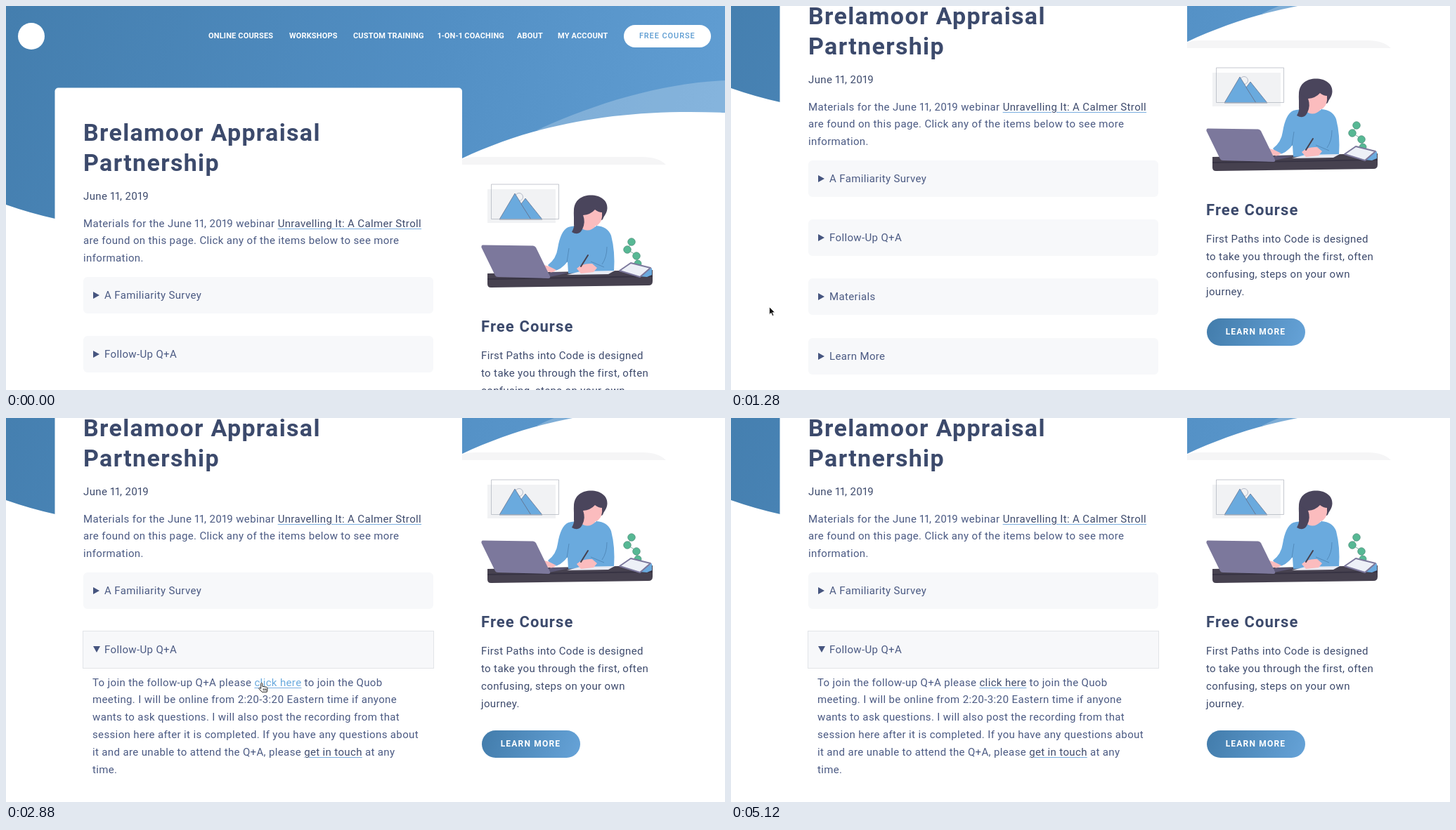
Animation, 1023 px wide and 547 px high, one loop 5280 ms. Source, as an HTML page:

```html
<!DOCTYPE html>
<html lang="en">
<head>
<meta charset="utf-8">
<title>Webinar page</title>
<style>
  html, body { margin: 0; width: 100%; height: 100%; overflow: hidden; background: #fff; }
  body { position: relative; font: 15px/24.85px Roboto, sans-serif; letter-spacing: .36px;
    font-variant-numeric: proportional-nums; color: #4b5a83; }
  #page, #page > *, #pointer { position: absolute; white-space: nowrap; margin: 0; }
  #page { left: 0; top: 0; width: 1023px; height: 720px; }
  svg { left: 0; top: 0; overflow: visible; }
  h1 { left: 110px; top: 158.5px; font: 600 34px/43.7px Roboto, sans-serif; letter-spacing: 1.33px; color: #3c4a6c; }
  h2 { left: 676px; top: 442px; font: 600 22px/30px Roboto, sans-serif; letter-spacing: 1.1px; color: #3c4a6c; }
  .dark, u { color: #3e4b6d; }
  u { text-decoration: underline 1px #7aaee0; text-underline-offset: 2px; }
  u.hover { color: #6aaade; }
  .nav { top: 31px; font-size: 11px; font-weight: bold; letter-spacing: .16px; color: #fff; }
  .pill { border-radius: 20px; text-align: center; }
  #cta { left: 879px; top: 26.5px; width: 123.5px; background: #fff; color: #5b9bd1;
    font: 500 11px/32.5px Roboto, sans-serif; letter-spacing: .9px; }
  #learn { left: 676.5px; top: 610.5px; width: 140px; color: #fff; background: linear-gradient(110deg, #427cab, #66a3d8);
    font: bold 12px/39.5px Roboto, sans-serif; letter-spacing: 1.2px; }
  .item { left: 110px; width: 468px; height: 52px; line-height: 52px; padding-left: 30px;
    border-radius: 6px; background: #f7f8fa; }
  .item::before { content: ""; position: absolute; left: 14px; top: 21px; width: 9px; height: 10px;
    background: #46557f; clip-path: polygon(0 0, 100% 50%, 0 100%); }
  .item.focus { border-radius: 0; box-shadow: 0 0 0 1px #e2e4e8; }
  .item.open::before { width: 10px; height: 9px; clip-path: polygon(0 0, 100% 0, 50% 100%); }
  .tiny { top: 710px; font-size: 5px; line-height: 8px; letter-spacing: .1px; color: #333; }
</style>
</head>
<body>
<div id="page">
  <svg width="1023" height="720">
    <defs>
      <linearGradient id="sky" gradientUnits="userSpaceOnUse" x1="0" y1="0" x2="960" y2="300">
        <stop offset="0" stop-color="#447eae"/><stop offset=".6" stop-color="#528fc4"/><stop offset="1" stop-color="#609dd2"/>
      </linearGradient>
    </defs>
    <path fill="url(#sky)" d="M0 0H1023V152C880 146 760 165 649 217V303H70Q34 295 0 283Z"/>
    <path fill="#fff" fill-opacity=".23" d="M1023 106C930 110 835 140 755 177H1023Z"/>
    <path fill="#f5f5f6" d="M649 218Q655 215 670 215H905Q928 215 939 226H649Z"/>
    <rect x="69.5" y="116.5" width="579.5" height="640" rx="5" fill="#fff"/>
    <circle cx="36" cy="43" r="19" fill="#fff"/>

    <!-- picture on the wall -->
    <path fill="#f1f2f4" d="M685 261H782V309H685Z"/>
    <g stroke="#5f6b86" stroke-width=".7">
      <circle cx="730" cy="272" r="5.5" fill="none" stroke="#9aa3b5"/>
      <path fill="#6aaade" d="M702 304L724 267L747 304Z"/>
      <path fill="#6aaade" d="M733 282L739 274L763 304H747Z"/>
      <path fill="none" stroke="#adb0ba" d="M690.5 254H786.5V303.5H690.5Z"/>
    </g>

    <!-- desk, plant and tablet -->
    <g fill="#57b894" stroke="#4b8a78" stroke-width=".7">
      <path fill="none" d="M890 336L884 347L897 355L899 368"/>
      <circle cx="890" cy="336" r="5.3"/><circle cx="884" cy="347" r="5.3"/>
      <circle cx="897" cy="356" r="5.3"/><circle cx="899" cy="367" r="5"/>
    </g>
    <path fill="#46414f" d="M685 381L920 376V392Q920 398 914 398L690 401Q685 401 685 396Z"/>
    <path fill="#373343" d="M685 388L920 384V386L685 390Z"/>
    <path fill="#6aaade" d="M900 385L919 373V383L912 386Z"/>
    <path fill="#edf0f7" stroke="#7c789c" stroke-width="2" stroke-linejoin="round" d="M873 377L889 366L917 373L902 386Z"/>

    <!-- woman at work -->
    <path fill="#4a455c" d="M808 292C808 276 820 269.500 832 269.500C846 269.500 856 277 855.500 288C855 296 851 298 849 304L834 312L808 312Z"/>
    <path fill="#fbbcbe" d="M821 298Q832 297 838 290Q843 294 848 294Q849 306 843 311Q840 314 838 313V322H818Q823 312 821 298Z"/>
    <path fill="#6aaade" d="M800 315Q808 312 817 315Q828 325 840 313Q856 314 861 327Q867 350 865 378L800 381L799 364Q790 376 778 378L771 369Q783 360 785 345Q789 320 800 315Z"/>
    <path fill="none" stroke="#4d83b3" stroke-width=".8" d="M798 365L801 345M855 343Q855 358 848 368M832 364L851 372"/>
    <path fill="#4a455c" d="M808 290C807 304 811 313 805 322Q815 328 820 318Q825 308 821 298Z"/>
    <path fill="#e9ebf3" d="M798 383L817 378L866 377L857 382Z"/>
    <path fill="#fbbcbe" d="M762 368L773 371L783 376L777 380L766 377ZM812 374Q820 366 834 367L841 373L836 379L818 381Z"/>
    <path stroke="#46414f" stroke-width="2" stroke-linecap="round" d="M828 355L818 371"/>
    <path fill="#5b5775" d="M697 386L773 386L801 380L778 379L770 381Z"/>
    <path fill="#7c789c" d="M678 340.500L750 341.500Q753 342 754 344L774 385Q775 388 772 388L700 386Q697 386 696 384L676.500 344Q676 341 678 340.500Z"/>
  </svg>

  <span class="nav" style="left:288px">ONLINE COURSES</span>
  <span class="nav" style="left:403px">WORKSHOPS</span>
  <span class="nav" style="left:494px">CUSTOM TRAINING</span>
  <span class="nav" style="left:614px">1-ON-1 COACHING</span>
  <span class="nav" style="left:727px">ABOUT</span>
  <span class="nav" style="left:785px">MY ACCOUNT</span>
  <span class="pill" id="cta">FREE COURSE</span>

  <h1>Brelamoor Appraisal<br>Partnership</h1>
  <p class="dark" style="left:110px;top:259px">June 11, 2019</p>
  <p style="left:110px;top:297.5px">Materials for the June 11, 2019 webinar <u>Unravelling It: A Calmer Stroll</u><br>are found on this page. Click any of the items below to see more<br>information.</p>

  <div class="item" style="top:386px">A Familiarity Survey</div>
  <div class="item" id="followUp" style="top:470px">Follow-Up Q+A</div>
  <div class="item later" style="top:554px">Materials</div>
  <div class="item later" style="top:639px">Learn More</div>
  <p id="answer" style="left:123px;top:530.5px">To join the follow-up Q+A please <u id="link">click here</u> to join the Quob<br>meeting. I will be online from 2:20-3:20 Eastern time if anyone<br>wants to ask questions. I will also post the recording from that<br>session here after it is completed. If you have any questions about<br>it and are unable to attend the Q+A, please <u>get in touch</u> at any<br>time.</p>

  <h2>Free Course</h2>
  <p class="dark" style="left:676px;top:486px">First Paths into Code is designed<br>to take you through the first, often<br>confusing, steps on your own<br>journey.</p>
  <span class="pill" id="learn">LEARN MORE</span>
  <span class="tiny" style="left:687px">Many people start using it as a direct</span>
  <span class="tiny" style="left:804px">Here's the thing you may not realize</span>
</div>

<svg id="pointer" width="1" height="1">
  <circle id="ring" cx="3" cy="7" r="14.3" fill="none" stroke="#111" stroke-width="1.1"/>
  <path id="arrow" fill="#111" stroke="#fff" stroke-width=".8" d="M0 0V11L2.600 8.600L4.400 12.800L6.400 12L4.600 8H8Z"/>
  <path id="beam" fill="none" stroke="#222" d="M-3 -6Q0 -6 0 -4Q0 -6 3 -6M0 -4V4M-3 6Q0 6 0 4Q0 6 3 6M-1.500 1H1.500"/>
  <path id="hand" fill="#fff" stroke="#222" stroke-width="1" stroke-linejoin="round"
    d="M-1 8V1Q0 -1 1.200 1V5L7 6Q8.500 6.500 8.300 8.500L7.500 13H0.500L-4 8Q-3.500 6 -1 8ZM2.500 8V11M4.500 8V11M6.300 8V11"/>
</svg>

<script>
const LOOP = 5280, STEP = 160, SCROLL = 166;
const $ = id => document.getElementById(id);
const show = (el, on) => { el.style.visibility = on ? "visible" : "hidden"; };
const showAll = (selector, on) => document.querySelectorAll(selector).forEach(el => show(el, on));

// time, x, y of the pointer's hot spot
const path = [
  [800, 40, 448], [1120, 40, 448], [1760, 133, 324], [2080, 133, 324],
  [2400, 227, 379], [3040, 389, 377], [4160, 389, 377], [5120, -24, 470]
];

function pointerAt(t) {
  const i = path.findIndex(key => key[0] > t);
  if (i < 1) return path[i ? path.length - 1 : 0].slice(1);
  const [t0, x0, y0] = path[i - 1], [t1, x1, y1] = path[i];
  const k = (t - t0) / (t1 - t0), ease = k * k * (3 - 2 * k);
  return [x0 + (x1 - x0) * ease, y0 + (y1 - y0) * ease];
}

function draw(now) {
  const t = Math.floor(now % LOOP / STEP) * STEP;
  const open = t >= 2080;
  const [x, y] = pointerAt(t);
  const onLink = open && x > 349 && x < 418 && y > 367 && y < 389;
  const onText = open && !onLink && x > 123 && x < 590 && y > 366 && y < 514;
  const visible = t >= 800 && t < 5120;

  $("page").style.transform = `translateY(${t >= 800 ? -SCROLL : 0}px)`;
  $("followUp").classList.toggle("focus", t >= 1920);
  $("followUp").classList.toggle("open", open);
  show($("answer"), open);
  showAll(".later", !open);
  showAll(".tiny", t >= 1440 && t < 2720);
  $("link").classList.toggle("hover", onLink);

  $("pointer").style.transform = `translate(${x}px, ${y}px)`;
  show($("arrow"), visible && !onLink && !onText);
  show($("beam"), visible && onText);
  show($("hand"), visible && onLink);
  show($("ring"), t === 1920);
  requestAnimationFrame(draw);
}
requestAnimationFrame(draw);
</script>
</body>
</html>
```
